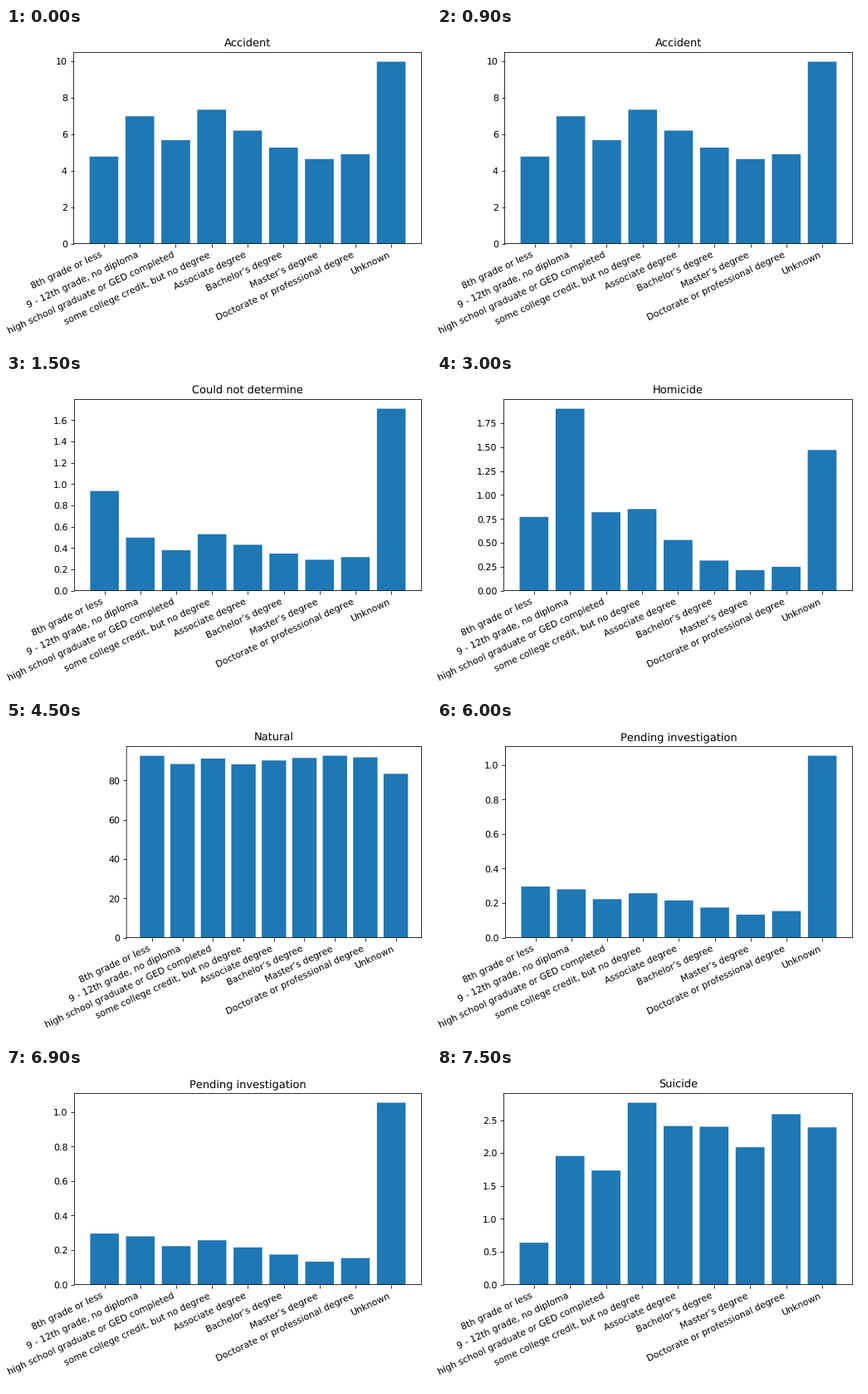
These frames come from a looping animation (512x384 px, 9 s). A matplotlib script:

```python
import matplotlib.pyplot as plt
import numpy as np
from matplotlib.animation import FuncAnimation

W, H, DPI = 512, 384, 80
RIGHT, TOP, BOTTOM = 500.4, 29.6, 259.6

LEVELS = [
    "8th grade or less",
    "9 - 12th grade, no diploma",
    "high school graduate or GED completed",
    "some college credit, but no degree",
    "Associate degree",
    "Bachelor’s degree",
    "Master’s degree",
    "Doctorate or professional degree",
    "Unknown",
]


def dip(high, low, power):
    """Shares of the five college levels: a fall, then a slight rise."""
    return low + (high - low) * abs(1 - np.arange(5) / 3.25) ** power


# Percent of deaths by education level
SHARES = {
    "Accident": [4.77, 6.98, 5.67, *dip(7.34, 4.57, 1.45), 9.97],
    "Could not determine": [0.935, 0.498, 0.38, *dip(0.53, 0.283, 1.4), 1.707],
    "Homicide": [0.771, 1.902, 0.82, *dip(0.853, 0.21, 1.9), 1.47],
    "Pending investigation": [0.296, 0.28, 0.223, *dip(0.257, 0.123, 1), 1.054],
    "Suicide": [0.637, 1.955, 1.735, 2.765, 2.41, 2.4, 2.088, 2.59, 2.39],
}
# All causes add up to 100 percent
SHARES["Natural"] = 100 - np.sum(list(SHARES.values()), axis=0)

# Left edge of the axes in pixels
LEFT = {
    "Accident": 81.6,
    "Could not determine": 82.4,
    "Homicide": 80.4,
    "Natural": 145.2,
    "Pending investigation": 82.4,
    "Suicide": 80.4,
}
CAUSES = sorted(SHARES)

plt.rcParams.update({
    "font.family": "DejaVu Sans",
    "text.hinting": "none",
    "text.hinting_factor": 1,
    "path.snap": False,
    "axes.linewidth": 0.72,
    "xtick.major.width": 0.72,
    "ytick.major.width": 0.72,
})
fig, ax = plt.subplots(figsize=(W / DPI, H / DPI), dpi=DPI)


def draw(i):
    cause = CAUSES[i]
    left = LEFT[cause]
    ax.clear()
    ax.set_position([left / W, 1 - BOTTOM / H,
                     (RIGHT - left) / W, (BOTTOM - TOP) / H])
    ax.bar(range(len(LEVELS)), SHARES[cause], color="#1f77b4")
    ax.set_xticks(range(len(LEVELS)), LEVELS, rotation=25, ha="right")
    ax.set_title(cause)
    return []


anim = FuncAnimation(fig, draw, frames=len(CAUSES), init_func=lambda: [],
                     interval=1500, repeat=True, repeat_delay=0)
plt.show()
```
